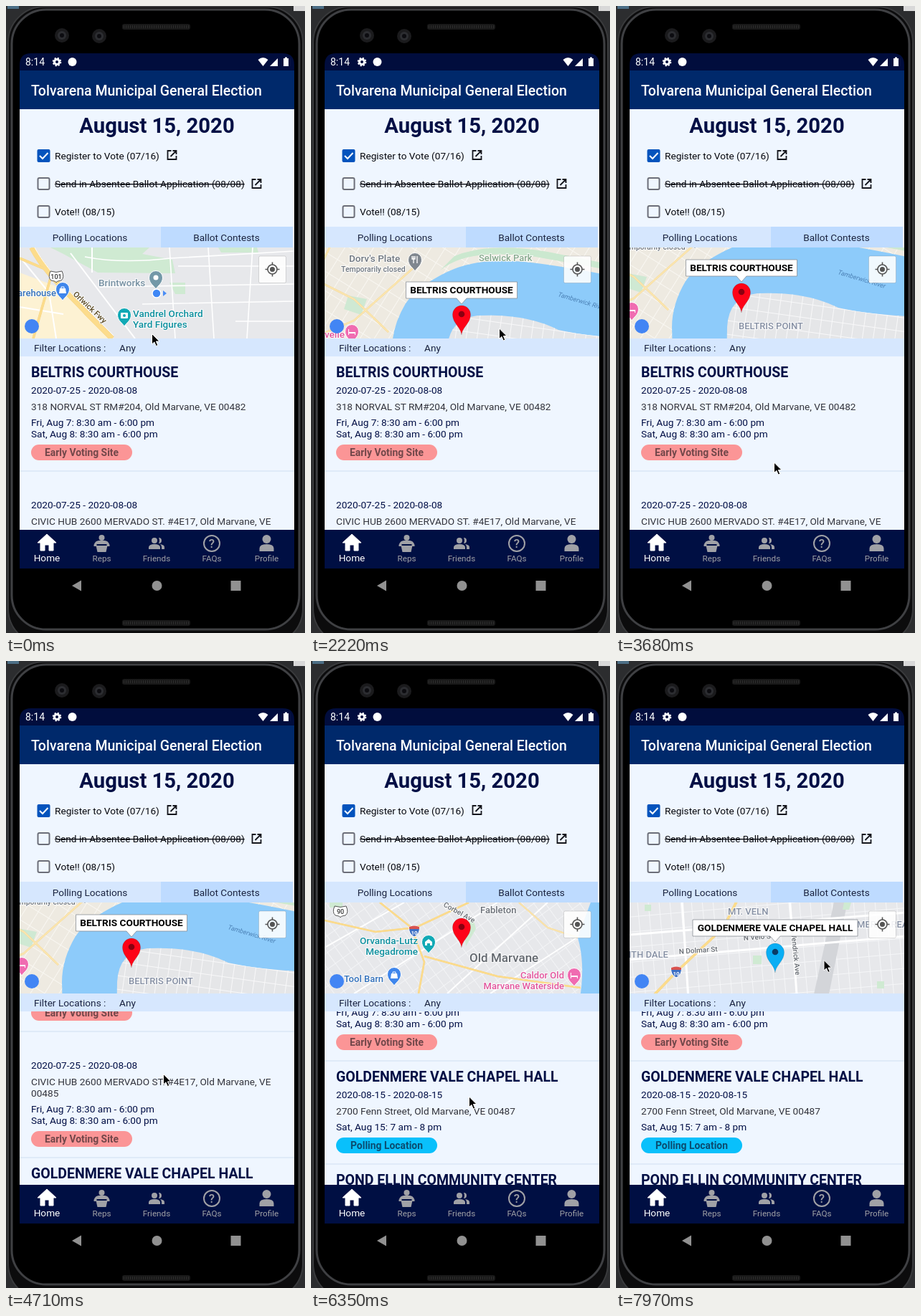
Write an HTML page that moves like this. It is 417 by 875 pixels and loops after 8 s.

```html
<!DOCTYPE html>
<html lang="en">
<head>
<meta charset="utf-8">
<title>Election app</title>
<style>
  html, body { margin: 0; width: 100%; height: 100%; overflow: hidden; background: #2c2d2f; }
  svg { display: block; width: 417px; height: 875px; font: 13.65px Roboto, sans-serif; white-space: pre; }
</style>
</head>
<body>
<svg id="stage" viewBox="0 0 417 875"></svg>
<script>
const NAVY = '#020f45', GREY = '#a0a1a6';
const city = 'Old Marvane';

// --- drawing helpers ---
const text = (x, y, s, fill = NAVY, extra = '') => `<text x="${x}" y="${y}" fill="${fill}" ${extra}>${s}</text>`;
const rect = (x, y, w, h, fill, extra = '') => `<rect x="${x}" y="${y}" width="${w}" height="${h}" fill="${fill}" ${extra}/>`;
const circle = (x, y, r, fill, extra = '') => `<circle cx="${x}" cy="${y}" r="${r}" fill="${fill}" ${extra}/>`;
const path = (d, fill, extra = '') => `<path d="${d}" fill="${fill}" ${extra}/>`;
const line = (d, stroke, width = 1, extra = '') => path(d, 'none', `stroke="${stroke}" stroke-width="${width}" ${extra}`);
const at = (x, y, body) => `<g transform="translate(${x} ${y})">${body}</g>`;
const group = (id, body) => `<g id="${id}">${body}</g>`;
const size = (px, weight = 400) => `font-size="${px}" font-weight="${weight}"`;
const BOLD = 'font-weight="700"', MID = 'text-anchor="middle"', END = 'text-anchor="end"';

// --- map parts ---
const label = (x, y, s, fill, px = 13, extra = '') =>
  text(x, y, s, fill, `font-size="${px}" font-weight="500" stroke="#fff" stroke-width="2" stroke-opacity=".8" paint-order="stroke" ${extra}`);
const turned = (x, y, angle, s, fill, px = 10) => label(x, y, s, fill, px, `transform="rotate(${angle} ${x} ${y})"`);
const road = (d, width = 3, color = '#fcdc8c') => line(d, '#f3d189', width + 0.6) + line(d, color, width);
const street = (d, width = 2) => line(d, '#fff', width);
const placePin = (x, y, color, glyph) =>
  at(x, y, path('M0 13C-3 8-9.500 5-9.500-3A9.500 9.500 0 0 1 9.500-3C9.500 5 3 8 0 13Z', color, 'stroke="#fff"') + glyph);
const bag = path('M-4-4H4L5 3H-5Z', '#fff') + line('M-2-4V-6H2V-4', '#fff');
const bed = path('M-5 2V-6H-4V-2H5V2H4V0H-4V2Z', '#fff');
const camera = rect(-5, -6, 10, 8, '#fff', 'rx="1"') + circle(0, -2, 2, '#11a9b5');
const dome = path('M-5 2V-3L0-7L5-3V2H2V-1H-2V2Z', '#fff');
const fork = line('M-2-8V2M-4-8V-4H0V-8M3 2V-8', '#fff', 1.3);
const interstate = (x, y) => at(x, y,
  path('M-7-6Q0-9 7-6Q9 3 0 8Q-9 3-7-6Z', '#3c6fc4', 'stroke="#fff"') + path('M-7-6Q0-9 7-6V-3H-7Z', '#d9534f') +
  text(0, 5, '10', '#fff', `${size(8, 700)} ${MID}`));
const shield = (x, y, n) => at(x, y,
  path('M-8-7Q0-4 8-7Q12 2 7 6Q0 7 0 9Q0 7-7 6Q-12 2-8-7Z', '#fff', 'stroke="#555"') + text(0, 4, n, '#333', `${size(9, 500)} ${MID}`));
const marker = (color, dot) =>
  path('M210 400C209 389 197.500 384 197.500 371.500A12.500 12.500 0 0 1 222.500 371.500C222.500 384 211 389 210 400Z', color, 'stroke="#0003" stroke-width=".6"') +
  circle(210, 371, 4.300, dot);
const callout = (id, width, s) => group(id,
  path(`M${210 - width / 2} 326h${width}v23H217l-7 8l-7-8H${210 - width / 2}Z`, '#fff', 'stroke="#8a8f96" stroke-width=".8"') +
  text(210, 342, s, '#000', `${BOLD} ${MID}`));
const grid = (id, w, h, angle, color, width = 1.5) =>
  `<pattern id="${id}" width="${w}" height="${h}" patternUnits="userSpaceOnUse" patternTransform="rotate(${angle})">${line(`M0 0H${w}M0 0V${h}`, color, width * 2)}</pattern>`;
const ground = (fill, pattern) => rect(-60, 220, 560, 340, fill) + rect(-60, 220, 560, 340, `url(#${pattern})`);

const campus = group('campus',
  rect(19, 337, 383, 127, '#e7e8eb') +
  path('M19 372L80 395L150 464H19Z', '#fdf2d3') +
  path('M62 337H200L190 346L232 354L236 373L128 372L80 346Z', '#cfead2') + path('M296 337H350L352 344H300Z', '#cfead2') +
  path('M228 386H250V402H236Z', '#cfead2') +
  street('M110 350Q160 360 230 352L402 342M228 337L236 464M282 337L290 464M344 337L336 464M130 392L402 388M190 416L402 412M240 363H402M320 440H402', 1.6) +
  street('M19 350L60 400L70 464M90 345L180 464M19 420L80 430M120 337V372') +
  road('M36 337C56 375 92 405 114 430L148 464', 7) + road('M19 352L52 366M62 380L38 464', 3) + street('M40 337C62 377 94 402 150 460', 1) +
  shield(70, 377, '101') +
  label(16, 405, 'arehouse', '#3371bb') + placePin(79, 398, '#3f86ec', bag) +
  turned(93, 403, 43, 'Orlwick Fwy', '#5b4a24', 11) +
  label(129, 391, 'Brintworks', '#7690a2', 13.5) + placePin(209, 382, '#7398a8', circle(0, -3, 3.500, '#fff')) +
  path('M219 397L224 401L219 405Z', '#4a8df5') + circle(210, 401, 6, '#3f87f5', 'stroke="#fff" stroke-width="1.500"') +
  placePin(165, 434, '#11a9b5', camera) +
  label(177, 434, 'Vandrel Orchard', '#0d8f9e', 13.5) + label(177, 449, 'Yard Figures', '#0d8f9e', 13.5));

const river = group('river',
  rect(-60, 220, 560, 340, '#8dcbfa') +
  ['#eeeae1', 'url(#quarter)'].map(f => path('M-60 220H500V335Q400 312 330 302Q280 294 240 298Q205 302 175 320Q146 336 132 356Q113 388 113 420L116 560H-60Z', f)).join('') +
  path('M180 310Q205 290 245 288Q290 286 330 294L440 314V306L330 284Q250 270 200 290Z', '#cbe8cf') + path('M52 345L78 350L70 372L46 364Z', '#cfe9d3') +
  road('M-40 300L60 350L108 396M30 270L0 330L-60 420M-60 430L60 380L150 300', 2, '#fbe6b0') +
  ['#e5e6e8', 'url(#point)'].map(f => path('M188 560L190 420Q192 378 232 373Q300 370 345 393Q390 404 500 408V560Z', f)).join('') +
  placePin(57, 398, '#f06cb1', bed) + label(19, 404, 'velle', '#e2559d', 13.5) +
  group('districtLabel', label(35, 342, 'VELDOR DISTR', '#7b8799', 13)) +
  label(53, 298, "Dorv's Plate", '#6f7780', 13.5) + label(42, 312, 'Temporarily closed', '#6f7780', 10.5) + placePin(145, 298, '#80878f', fork) +
  label(234, 297, 'Selwick Park', '#86a98d', 13) +
  text(344, 346, 'Tamberwick River', '#4b80b5', 'font-size="9" font-style="italic" transform="rotate(17 344 346)"') +
  label(206, 423, 'BELTRIS POINT', '#858fa3', 13) +
  marker('#fd0318', '#8b0010') + callout('riverCallout', 155, 'BELTRIS COURTHOUSE'));

const downtown = group('downtown',
  ground('#e7e8eb', 'blocks') +
  path('M376 464Q382 420 372 386L390 337H402V464Z', '#8dcbfa') +
  path('M212 366L226 358L230 374L216 398Z', '#cfead2') + path('M120 395H140V410H122Z', '#d6d9de') + path('M26 337H44V344H26Z', '#cfead2') +
  street('M19 400L130 337M60 464L260 337M190 464L330 337M250 464L374 384', 2) +
  road('M96 337L140 372L158 420L150 464M19 362L90 378L146 372L220 337M158 412L260 440L376 456', 2) +
  road('M290 337L330 372L372 386', 1.5, '#fbe6b0') +
  shield(41, 349, '90') + interstate(144, 377) +
  turned(184, 342, 29, 'Corbel Ave', '#666b72') + label(236, 352, 'Fableton', '#6b7078', 13) +
  label(149, 395, 'Orvanda-Lutz', '#0d8f9e', 13.5, END) + label(149, 410, 'Megadrome', '#0d8f9e', 13.5, END) + placePin(164, 395, '#11a9b5', dome) +
  label(221, 420, city, '#62676e', 17) +
  label(353, 443, 'Caldor Old', '#e2559d', 13, END) + label(353, 458, 'Marvane Waterside', '#e2559d', 13, END) + placePin(367, 441, '#f06cb1', bed) +
  label(101, 448, 'nt Tool Barn', '#3371bb', 13, END) + placePin(116, 440, '#3f86ec', bag) +
  marker('#fd0318', '#8b0010'));

const ward = group('ward', at(-12, -35,
  ground('#e7e8eb', 'wards') +
  path('M312 300H330L286 520H264Z', '#d3d5d9') + rect(191, 411, 12, 12, '#cfead2') + path('M122 361H141V374H124Z', '#cfead2') +
  path('M318 337H328L325 347H316Z', '#cfead2') + rect(364, 447, 10, 10, '#cfead2') + rect(40, 340, 9, 9, '#cfead2') +
  street('M-20 420L430 382M-20 385L430 349M240 300L256 520M90 300L104 520', 3) +
  road('M20 500L84 434L150 372L186 300', 3) +
  label(156, 354, 'MT. VELN', '#858fa3', 13) + label(178, 390, 'N Velo St', '#666b72', 10, 'transform="rotate(-4 178 390)"') +
  label(12, 414, 'NTH DALE', '#858fa3', 13) + turned(88, 409, -4, 'N Dolmar St', '#666b72') +
  turned(244, 378, 84, 'Wendrick Ave', '#666b72') + label(336, 372, 'MERA AREA', '#858fa3', 13) + interstate(84, 434)) +
  marker('#09aef4', '#0a3c66') + callout('wardCallout', 230, 'GOLDENMERE VALE CHAPEL HALL'));

// --- list of polling places ---
const sites = { early: ['#fb9596', '#72474a', 'Early Voting Site'], polling: ['#09c0fb', '#0b4c70', 'Polling Location'] };
function card(y, title, dates, address, hours, kind) {
  const [fill, ink, name] = sites[kind];
  const hoursY = y + 59 + 16 * address.length;
  const pillY = hoursY + 16 * hours.length - 6;
  return text(35, y + 7, title, NAVY, size(19.5, 700)) + text(35, y + 29.500, dates) +
    address.map((s, i) => text(35, y + 53 + 16 * i, s, '#33343c')).join('') +
    hours.map((s, i) => text(35, hoursY + 16 * i, s)).join('') +
    rect(35, pillY, 141, 22, fill, 'rx="11"') + text(105.500, pillY + 16, name, ink, `${size(13.9, 700)} ${MID}`) +
    rect(19, pillY + 36.500, 383, 1, '#cfe0f1');
}
const earlyDates = '2020-07-25 - 2020-08-08', voteDates = '2020-08-15 - 2020-08-15';
const earlyHours = ['Fri, Aug 7: 8:30 am - 6:00 pm', 'Sat, Aug 8: 8:30 am - 6:00 pm'];
const list = group('list',
  card(511, 'BELTRIS COURTHOUSE', earlyDates, [`318 NORVAL ST RM#204, ${city}, VE 00482`], earlyHours, 'early') +
  card(671, '', earlyDates, [`CIVIC HUB 2600 MERVADO ST. #4E17, ${city}, VE`, '00485'], earlyHours, 'early') +
  card(847, 'GOLDENMERE VALE CHAPEL HALL', voteDates, [`2700 Fenn Street, ${city}, VE 00487`], ['Sat, Aug 15: 7 am - 8 pm'], 'polling') +
  card(991, 'POND ELLIN COMMUNITY CENTER', voteDates, [], [], 'polling'));

// --- fixed interface ---
const speaker = y => rect(162, y, 95, 8, '#191919', 'rx="3"') + line(`M164 ${y + 4}H256`, '#2d2d2d', 4, 'stroke-dasharray="1 2"');
const lens = (x, y) => circle(x, y, 10, '#1b1b1d') + circle(x, y, 6, '#2c2d31') + circle(x, y, 3, '#0c0c10');
const phone =
  rect(0, 0, 417, 875, '#2c2d2f') + rect(2, 0, 16, 4, '#4d6f86') + rect(401, 0, 16, 7, '#d8d8d8') +
  rect(3, 1, 411, 890, '#0c0c0d', 'rx="50" stroke="#3a3b3d" stroke-width="2"') +
  rect(8, 5, 401, 865, '#000', 'rx="48" stroke="#3f4043" stroke-width="3"') +
  lens(78, 41) + lens(130, 42) + speaker(25) + speaker(857);

const statusBar = path('M19 90V82Q19 66 35 66H386Q402 66 402 82V90Z', '#010d3d') +
  text(27, 83, '8:14', '#fff', size(14)) +
  circle(71, 78, 3.500, 'none', 'stroke="#fff" stroke-width="3"') + circle(71, 78, 5.300, 'none', 'stroke="#fff" stroke-width="2" stroke-dasharray="2.200 1.970"') +
  circle(92.500, 78, 6, '#fff') +
  path('M358.500 84L351.500 75Q358.500 69 365.500 75Z', '#fff') + path('M368 84L379 73V84Z', '#fff') + path('M387 73H389V71.500H392V73H394V84H387Z', '#fff');

const openIcon = (x, y) => at(x, y, line('M-1-6H-6V6H6V1M1-6H6V-1M6-6L-2 2', '#15161c', 1.8));
const emptyBox = y => rect(44.500, y - 8, 16, 16, 'none', 'rx="2" stroke="#6c6e78" stroke-width="2"');
const overview = rect(19, 90, 383, 641, '#eff6ff') + rect(19, 90, 383, 54, '#00296b') +
  text(35, 124.500, 'Tolvarena Municipal General Election', '#fff', size(19.5, 500)) +
  text(210.500, 177, 'August 15, 2020', NAVY, `${size(29.25, 700)} ${MID}`) +
  rect(43.500, 200, 18, 18, '#0353bd', 'rx="2"') + line('M47 209L51 213L58.500 205', '#fff', 2) + emptyBox(248) + emptyBox(287) +
  text(68, 214, 'Register to Vote (07/16)', '#08090f') + openIcon(231.500, 208) +
  text(68, 253, 'Send in Absentee Ballot Application (08/08)', '#08090f', 'text-decoration="line-through"') + openIcon(349.500, 248) +
  text(68, 292, 'Vote!! (08/15)', '#08090f') +
  rect(19, 308, 197, 29, '#d6e7fe') + rect(216, 308, 184, 29, '#bedbff') +
  text(117, 328, 'Polling Locations', '#1b2440', MID) + text(307.500, 328, 'Ballot Contests', '#1b2440', MID);

const mapControls = circle(36, 447, 10, '#4285f4') +
  rect(352.500, 349, 38, 37.500, '#fff', 'rx="2" fill-opacity=".88" stroke="#0002"') +
  circle(371.500, 367.500, 6.500, 'none', 'stroke="#555" stroke-width="1.600"') + circle(371.500, 367.500, 3.500, '#555') +
  line('M371.500 357.500V361M371.500 374V377.500M361.500 367.500H365M378 367.500H381.500', '#555', 1.6);

const filterBar = rect(19, 464, 383, 25, '#d6e7fe') + text(39, 482, 'Filter Locations :', '#1b2440') + text(158, 482, 'Any', '#1b2440');

const tab = (x, name, icon, color = GREY, px = 11.7) => at(x, 750, icon) + text(x, 775, name, color, `font-size="${px}" ${MID}`);
const tabs = rect(19, 731, 383, 54, '#000f43') +
  tab(57, 'Home', path('M0-13L13-1H9V10H3V2H-3V10H-9V-1H-13Z', '#fff', 'stroke="#fff" stroke-linejoin="round"'), '#fff', 13.65) +
  tab(133.500, 'Reps', circle(0, -8, 4, GREY) + path('M-11 2Q-9-4-4-4H4Q9-4 11 2V4H7V1H-7V4H-11Z', GREY) + path('M-8 3H8L6 12H-6Z', GREY)) +
  tab(210, 'Friends', circle(-3, -4, 4, GREY) + path('M-11 8V5Q-10 1-3 1T5 5V8Z', GREY) + path('M3-8A4 4 0 1 1 3 0Q5-4 3-8ZM5 1Q11 2 11 5V8H7V5Q7 3 5 1Z', GREY)) +
  tab(287, 'FAQs', circle(0, 0, 11, 'none', `stroke="${GREY}" stroke-width="2"`) + text(0, 6, '?', GREY, `${size(17, 500)} ${MID}`)) +
  tab(363.500, 'Profile', circle(0, -6, 6, GREY) + path('M-10 11V7Q-10 1 0 1T10 7V11Z', GREY));
const systemNav = path('M19 785H402V815Q402 831 386 831H35Q19 831 19 815Z', '#000') +
  path('M92 809L105 801.500V816.500Z', '#919191') + circle(210.500, 809, 7, '#919191') + rect(313.500, 802, 14, 14, '#919191');

const cursor = group('cursor', path('M0 0V14.500L3.400 11.400L5.800 17L8.300 16L5.900 10.500H10.500Z', '#000', 'stroke="#fff" stroke-width="1"'));

document.getElementById('stage').innerHTML =
  `<defs><clipPath id="mapClip">${rect(19, 337, 383, 127)}</clipPath><clipPath id="listClip">${rect(19, 489, 383, 242)}</clipPath>
  ${grid('quarter', 17, 23, 32, '#f9f7f2', 1)}${grid('point', 15, 19, 8, '#f8f8f9', 1)}${grid('blocks', 13, 19, -36, '#f3f4f6', 1)}${grid('wards', 15, 21, -5, '#f5f6f8', 1)}</defs>` +
  phone + statusBar + overview +
  `<g clip-path="url(#mapClip)">${campus}${river}${downtown}${ward}${mapControls}</g>` +
  `<g clip-path="url(#listClip)">${list}</g>` + filterBar + tabs + systemNav + cursor;

// --- motion: keys are [step, x, y], one step being a held picture ---
const LOOP = 8000, STEP = 147.5;
const cursorKeys = [[0, 203.5, 457.5], [2, 195, 531], [3, 195, 531], [5, 207, 402], [6, 212, 390], [7, 268.5, 417.5], [11, 264, 391],
  [15, 262.5, 450], [16, 262.5, 450], [19, 228, 419], [20, 228, 419], [25, 220.5, 637], [27, 220.5, 650], [32, 219.5, 576.5], [35, 220, 577],
  [37, 220, 690], [41, 220.5, 608], [45, 220.5, 608], [47, 212, 385], [48, 212, 385], [51, 278, 383], [54, 290, 417.5]];
const riverKeys = [[11, 0, 0], [15, 0, 59], [16, 0, 59], [19, -35, 28]];
const wardKeys = [[51, 0, 0], [54, 12, 35]];
const scrollKeys = [[27, 0, 0], [32, 0, -132], [37, 0, -132], [42, 0, -267]];

function track(keys, step) {
  const next = keys.findIndex(k => k[0] > step);
  if (next < 0) return keys[keys.length - 1].slice(1);
  if (next === 0) return keys[0].slice(1);
  const [a, b] = [keys[next - 1], keys[next]];
  const f = (step - a[0]) / (b[0] - a[0]);
  return [1, 2].map(i => a[i] + (b[i] - a[i]) * f);
}
const el = id => document.getElementById(id);
const move = (id, keys, step) => el(id).setAttribute('transform', `translate(${track(keys, step).join(' ')})`);
const show = (id, on) => el(id).setAttribute('visibility', on ? 'inherit' : 'hidden');

function draw(now) {
  const step = Math.floor((now % LOOP + 10) / STEP);
  show('campus', step < 4);
  show('river', step >= 4 && step < 35);
  show('districtLabel', step < 13);
  show('riverCallout', step >= 6);
  show('downtown', step >= 35 && step < 45);
  show('ward', step >= 45);
  show('wardCallout', step >= 48);
  move('river', riverKeys, step);
  move('ward', wardKeys, step);
  move('list', scrollKeys, step);
  move('cursor', cursorKeys, step);
}
const start = performance.now();
function tick() {
  draw(performance.now() - start);
  requestAnimationFrame(tick);
}
tick();
</script>
</body>
</html>
```
